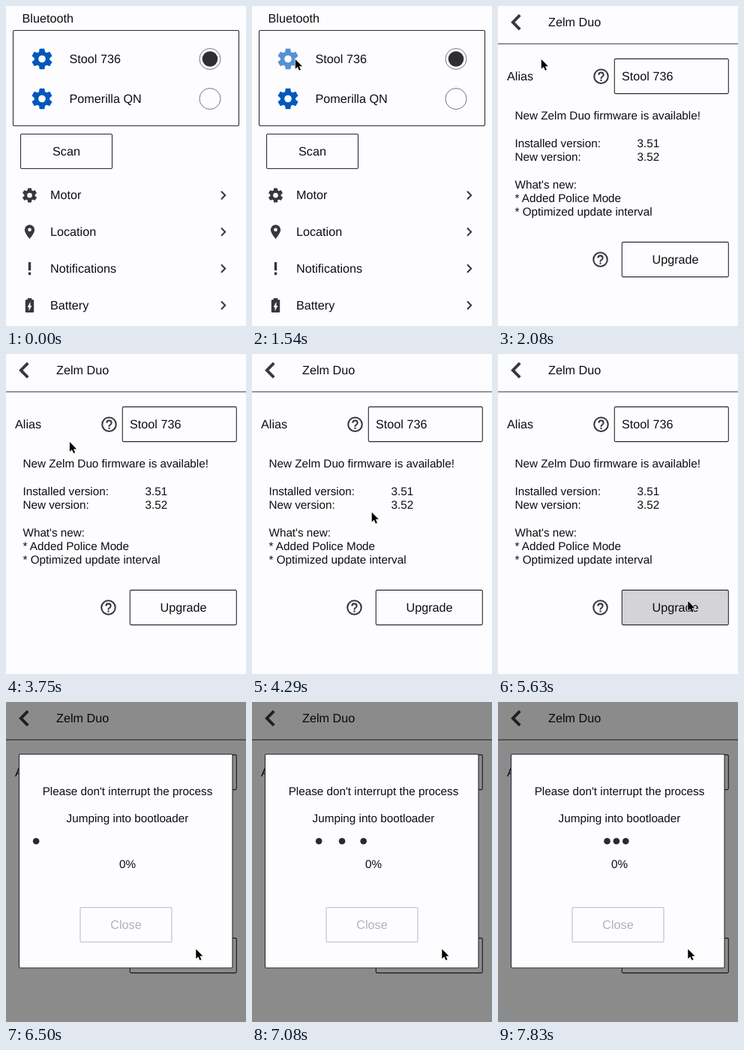
These frames come from a looping animation (320x426 px, 8000 ms). An HTML page:

```html
<!DOCTYPE html>
<html lang="en">
<head>
<meta charset="utf-8">
<title>Firmware upgrade</title>
<style>
  html, body { margin: 0; width: 100%; height: 100%; overflow: hidden; background: #fdfcff; }
  svg { display: block; width: 100%; height: 100%; font: 16.2px "Liberation Sans", Arial, sans-serif; fill: #0e0d10; text-rendering: geometricPrecision; }
  .small { font-size: 15.25px; }
  .box { fill: none; stroke: #2b2a2e; stroke-width: 1.1; }
  .icon { fill: #38373b; }
  .line { fill: none; stroke: #38373b; }
  .mid { text-anchor: middle; }
  .off { fill: #b2b1b4; }
</style>
</head>
<body>
<svg id="stage" viewBox="0 0 320 426"></svg>
<script>
const LOOP = 8000;
const OPEN_PAGE = 1670, OPEN_DIALOG = 5670;

const text = (x, y, value, cls = '') => `<text x="${x}" y="${y - .6}" class="${cls}">${value}</text>`;
const box = (x, y, w, h, attrs = '') =>
  `<rect x="${x}" y="${y}" width="${w}" height="${h}" rx="1.5" class="box" ${attrs}/>`;
const at = (x, y, scale, body, attrs = 'class="icon"') =>
  `<g transform="translate(${x} ${y}) scale(${scale})" ${attrs}>${body}</g>`;

// Icons are drawn around their own centre in a 24-unit box.
const tooth = i => `<path transform="rotate(${i * 60})" d="M-3-6-2.5-9.6-2-10H2L2.5-9.6 3-6Z"/>`;
const gear = '<path fill-rule="evenodd" d="M-7.5 0a7.5 7.5 0 1 1 15 0a7.5 7.5 0 1 1-15 0M-3.5 0a3.5 3.5 0 1 0 7 0a3.5 3.5 0 1 0-7 0"/>'
  + [0, 1, 2, 3, 4, 5].map(tooth).join('');
const pin = '<path fill-rule="evenodd" d="M0-10A7 7 0 0 0-7-3C-7 2.25 0 10 0 10S7 2.25 7-3A7 7 0 0 0 0-10M0-.5A2.5 2.5 0 1 1 0-5.5A2.5 2.5 0 1 1 0-.5"/>';
const bang = '<path d="M-2-10H2V3H-2ZM-2 6H2V10H-2Z"/>';
const battery = '<path fill-rule="evenodd" d="M4.7-8H3V-10H-3V-8H-4.7Q-6-8-6-6.7V8.7Q-6 10-4.7 10H4.7Q6 10 6 8.7V-6.7Q6-8 4.7-8M-1 8V2.5H-3L1-5V.5H3Z"/>';
const help = '<circle r="9" class="line" stroke-width="2"/>'
  + '<path d="M0-6A4 4 0 0 0-4-2H-2A2 2 0 0 1 2-2C2 0-1-.25-1 3H1C1 .75 4 .5 4-2A4 4 0 0 0 0-6M-1 4H1V6H-1Z"/>';

const device = (y, name, id) =>
  at(48, y, 1.37, gear, `id="${id}" fill="#0058bd"`) + text(84.5, y + 5.8, name)
  + `<circle cx="272" cy="${y}" r="14" fill="none" stroke="#77767a"/>`;
const menuRow = (y, icon, scale, label) =>
  at(31.5, y, scale, icon) + text(59, y + 5.8, label)
  + `<path d="M287 ${y - 5.2}l5.2 5.2-5.2 5.2" class="line" stroke-width="2"/>`;

const settings = text(21.5, 22.3, 'Bluetooth')
  + box(9.5, 32.5, 301, 127)
  + device(70.5, 'Stool 736', 'gear') + device(123.5, 'Pomerilla QN', 'gear2')
  + '<circle cx="272" cy="70.5" r="10.3" fill="#2f2e33"/>'
  + box(19.5, 170.5, 122, 46) + text(80.5, 199.8, 'Scan', 'mid')
  + menuRow(252, gear, .96, 'Motor') + menuRow(300.7, pin, .95, 'Location')
  + menuRow(349.5, bang, .85, 'Notifications') + menuRow(398.5, battery, .95, 'Battery');

const firmware = '<path d="M29.2 12.2 19.8 21.7l9.4 9.5" class="line" stroke-width="3.8"/>'
  + text(67, 28, 'Zelm Duo')
  + '<path d="M0 50.3H320" class="line"/>'
  + text(12, 99.5, 'Alias') + at(137.5, 93.7, 1.03, help)
  + box(155.3, 70.4, 152, 46.2) + text(165, 99.5, 'Stool 736')
  + [[151.5, 'New Zelm Duo firmware is available!'], [188.4, 'Installed version:'], [206.7, 'New version:'],
     [243.3, "What's new:"], [261.6, '* Added Police Mode'], [279.9, '* Optimized update interval']]
    .map(([y, value]) => text(22.5, y, value, 'small')).join('')
  + text(185.5, 188.4, '3.51', 'small') + text(185.5, 206.7, '3.52', 'small')
  + at(136.5, 337.5, 1.03, help)
  + box(165.3, 314.4, 142, 46.2, 'id="upgrade"') + text(236.5, 343.4, 'Upgrade', 'mid');

const dialog = '<rect width="320" height="426" fill="#000" opacity=".45"/>'
  + box(17.5, 69.5, 284.5, 284.5, 'style="fill:#fdfcff"')
  + text(162, 124.2, "Please don't interrupt the process", 'mid small')
  + text(162, 160.2, 'Jumping into bootloader', 'mid small')
  + text(162, 221.2, '0%', 'mid small')
  + box(99, 273.5, 122, 46, 'style="stroke:#bdbcbf"') + text(160, 302.4, 'Close', 'mid off')
  + '<g clip-path="url(#inside)">' + '<circle class="dot" cy="185.3" r="4.3" fill="#2b2a2e"/>'.repeat(3) + '</g>';

const stage = document.getElementById('stage');
stage.innerHTML = '<clipPath id="inside"><path d="M18 70H302V354H18Z"/></clipPath>'
  + `<g id="settings">${settings}</g><g id="firmware">${firmware}</g><g id="dialog">${dialog}</g>`
  + '<g id="cursor"><path transform="translate(.8 .9) scale(.88)" d="M0 0V14.6L3.4 11.5 5.8 17 8.2 16 5.8 10.7H10.4Z" fill="#000" stroke="#fff" stroke-width="1.6" paint-order="stroke"/></g>';

const byId = id => document.getElementById(id);
const dots = [...document.querySelectorAll('.dot')];
const show = (id, on) => byId(id).style.display = on ? '' : 'none';
const clamp = v => Math.min(1, Math.max(0, v));

// Pointer keys: time, x, y. Repeated positions are rests.
const keys = [[30, -12, 240], [1340, 57, 70], [3460, 57, 70], [3750, 84, 116], [4880, 239, 308], [5130, 252.5, 328]];

function slope(i, axis) {
  const before = keys[i - 1], after = keys[i + 1], here = keys[i];
  if (!before || !after || here[axis] === before[axis] || here[axis] === after[axis]) return 0;
  return (after[axis] - before[axis]) / (after[0] - before[0]);
}

// Cubic Hermite interpolation, at rest at both ends of each journey.
function pointer(t, axis) {
  const next = keys.findIndex(k => k[0] > t);
  if (next === 0) return keys[0][axis];
  if (next < 0) return keys[keys.length - 1][axis];
  const a = keys[next - 1], b = keys[next], span = b[0] - a[0], p = (t - a[0]) / span;
  const q = 1 - p;
  return a[axis] * q * q * (1 + 2 * p) + b[axis] * p * p * (3 - 2 * p)
    + span * p * q * (q * slope(next - 1, axis) - p * slope(next, axis));
}

function draw(t) {
  show('settings', t < OPEN_PAGE);
  show('firmware', t >= OPEN_PAGE);
  show('dialog', t >= OPEN_DIALOG);
  byId('gear').style.opacity = t >= 1500 ? .65 : 1;
  byId('upgrade').style.fill = t >= 5330 && t < OPEN_DIALOG ? '#d4d3d6' : 'none';
  byId('cursor').setAttribute('transform', `translate(${pointer(t, 1)} ${pointer(t, 2)})`);
  dots.forEach((dot, i) => {
    const p = clamp((t - 6380 - i * 150) / 1100);
    const rest = 170.3 - i * 12.4;
    dot.setAttribute('cx', 6 + (rest - 6) * (1 - (1 - p) ** 2));
  });
}

function tick() {
  draw(performance.now() % LOOP);
  requestAnimationFrame(tick);
}
tick();
</script>
</body>
</html>
```
